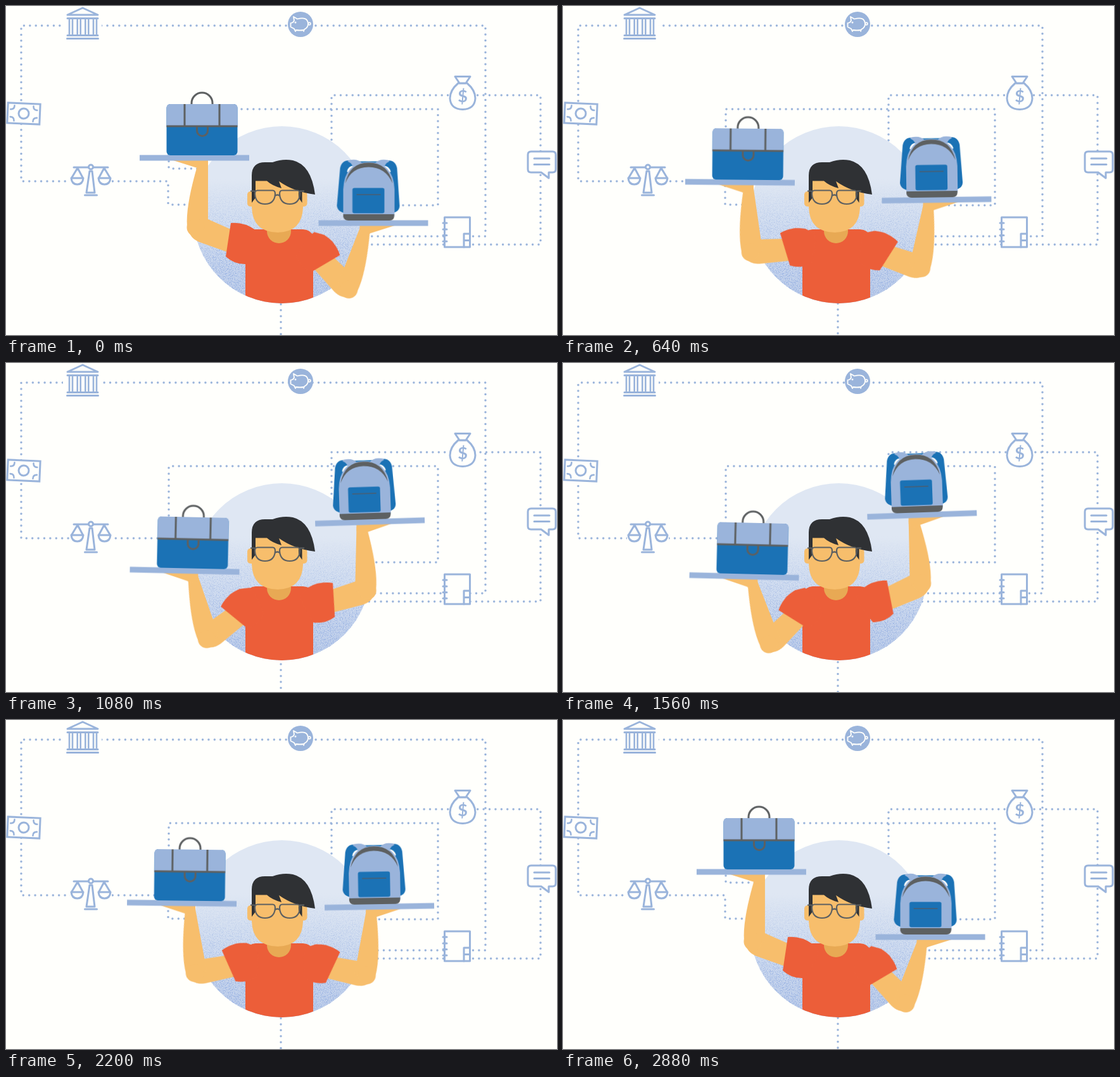
An HTML page for the animation above (2920 ms loop, 870 by 520 pixels).

```html
<!DOCTYPE html>
<html lang="en">
<head>
<meta charset="utf-8">
<title>Weighing the options</title>
<style>
  html, body { margin: 0; width: 100%; height: 100%; overflow: hidden; background: #fffffc; }
  svg { display: block; width: 870px; height: 520px; }

  .paper { fill: #fffffc; }
  .pale { fill: #9ab4db; }
  .blue { fill: #1b72b5; }
  .gray { fill: #5d6061; }
  .skin { fill: #f7be6c; }
  .shirt { fill: #ec5e39; }
  .hair { fill: #2f3134; }
  .line { fill: none; stroke: #5d6061; stroke-width: 3; }
  .icons { fill: none; stroke: #9ab4db; stroke-width: 3; stroke-linecap: round; stroke-linejoin: round; }
  .icons .back { fill: #fffffc; }
  .icons .gap { fill: #fffffc; stroke: none; }
  .icons text { fill: #9ab4db; stroke: none; font: bold 27px Lato, sans-serif; text-anchor: middle; }

  .dots {
    fill: none; stroke: #9ab4db; stroke-width: 3.5; stroke-linecap: round;
    stroke-dasharray: 0 9.4; animation: flow 2920ms linear infinite;
  }
  @keyframes flow { to { stroke-dashoffset: -37.6px; } }

  /* Each joint swings between --a and --b */
  .joint { animation: swing 1460ms cubic-bezier(.5, 0, .5, 1) infinite alternate; }
  @keyframes swing {
    from { transform: rotate(var(--a)); }
    to { transform: rotate(var(--b)); }
  }
  .shoulder { transform-origin: 384px 378px; }
  .elbow { transform-origin: 299px 350px; }
  .wrist { transform-origin: 310px 250px; }
  .left .shoulder { --a: 0deg; --b: -67deg; }
  .left .elbow { --a: 0deg; --b: 45.5deg; }
  .left .wrist { --a: 0deg; --b: 22.9deg; }
  .right .shoulder { --a: -68deg; --b: 3deg; }
  .right .elbow { --a: 46.5deg; --b: -1.7deg; }
  .right .wrist { --a: 21.5deg; --b: .7deg; }
</style>
</head>
<body>
<svg viewBox="0 0 870 520" xmlns="http://www.w3.org/2000/svg">
  <defs>
    <linearGradient id="sky" x1="0" y1="0" x2="0" y2="1">
      <stop offset=".3" stop-color="#dfe7f3"/>
      <stop offset=".65" stop-color="#cddaef"/>
      <stop offset="1" stop-color="#bccce9"/>
    </linearGradient>
    <linearGradient id="fade" x1="0" y1="0" x2="0" y2="1">
      <stop offset=".32" stop-color="#000"/>
      <stop offset=".8" stop-color="#fff"/>
    </linearGradient>
    <clipPath id="disc"><circle cx="435.5" cy="330" r="140"/></clipPath>
    <mask id="low"><circle cx="435.5" cy="330" r="140" fill="url(#fade)"/></mask>
    <filter id="grain" x="0" y="0" width="1" height="1" color-interpolation-filters="sRGB">
      <feTurbulence type="fractalNoise" baseFrequency=".8" numOctaves="2" seed="4"/>
      <feColorMatrix values="0 0 0 0 .56  0 0 0 0 .67  0 0 0 0 .88  5 0 0 0 -2.5"/>
    </filter>

    <!-- Arm parts, in the raised pose -->
    <g id="upper">
      <path class="skin" d="M362 356L355 353L319 337L300 338L288 352Q290 367 305 373L347 388L362 393Z"/>
      <path class="shirt" d="M355 343Q376 341 394 354L404 367L400 380L380 408Q361 409 347 396Z"/>
    </g>
    <g id="fore">
      <path class="skin" d="M302 253Q281 325 287 356L299 362L319 350V250Z"/>
      <circle class="skin" cx="299.5" cy="350" r="14"/>
    </g>
    <g id="hand">
      <path class="skin" d="M264 244H319V254Q311 262 302 256Z"/>
      <rect class="pale" x="211" y="235.5" width="173" height="9"/>
    </g>

    <g id="briefcase">
      <path class="line" d="M293 155V153.5A16.5 16.5 0 0 1 326 153.5V155"/>
      <rect class="blue" x="253.5" y="155" width="112" height="81" rx="6"/>
      <path class="pale" d="M253.5 190V161Q253.5 155 259.5 155H359.5Q365.5 155 365.5 161V190Z"/>
      <path class="line" d="M253.5 190H365.5M282 155V190M337 155V190M301.5 190V197A8.5 8.5 0 0 0 318.5 197V190"/>
    </g>

    <g id="backpack">
      <path class="blue" d="M552 246Q532 240 529 257L524 316Q525 327 540 328H608Q623 327 623 316L619 257Q616 240 596 246Z"/>
      <path class="paper" d="M540 262Q542 252 552 253H596Q606 252 609 262L600 275H550Z"/>
      <path class="pale" d="M543 244Q557 241 564 249L549 262Q552 251 541 246ZM605 244Q591 241 584 249L600 262Q596 251 607 246Z"/>
      <path class="pale" d="M534 332V290Q536 247 574 247Q613 247 615 290V332Z"/>
      <path class="gray" d="M537 281Q544 248 574 248Q605 248 612 281Q601 255 574 255Q547 255 537 281Z"/>
      <rect class="blue" x="548.5" y="288" width="50.5" height="40" rx="3"/>
      <path d="M555 298.5H593" stroke="#3f6280" stroke-width="1.8"/>
      <path class="gray" d="M534 329.5H614.5V333Q614 339.5 607 339.5H542Q535 339.5 534 333Z"/>
    </g>
  </defs>

  <rect class="paper" width="870" height="520"/>

  <g class="dots">
    <path d="M310 314H256V277H24V31H757V364H560"/>
    <path d="M330 257H257V163H682V315H560"/>
    <path d="M514 230V141H844V377H560"/>
    <path d="M434 462V524"/>
  </g>

  <g class="icons">
    <!-- Bank -->
    <rect class="gap" x="90" y="22" width="61" height="20"/>
    <path d="M97 14L121 3L145 14ZM97 19.5H145M97 46.5H145M96.5 51.5H145.5"/>
    <path d="M100 20V46M105 20V46M112.7 20V46M117.7 20V46M125.3 20V46M130.3 20V46M138 20V46M143 20V46" stroke-width="2.6"/>

    <!-- Banknote -->
    <g transform="rotate(2.5 28 170)">
      <rect class="back" x="2.5" y="154" width="51" height="32" stroke-linejoin="miter"/>
      <circle cx="28" cy="170" r="8"/>
      <path d="M7 164Q13 164 13 158M49 164Q43 164 43 158M7 176Q13 176 13 182M49 176Q43 176 43 182" stroke-width="2.6"/>
    </g>

    <!-- Scales -->
    <rect class="gap" x="101" y="266" width="66" height="22"/>
    <path d="M107 255H130M138 255H161M113 256L104 271M113 256L121 271M155 256L147 271M155 256L164 271"/>
    <path d="M103 272H122Q121 282 112.5 282Q104 282 103 272ZM146 272H165Q164 282 155.5 282Q147 282 146 272Z"/>
    <path class="back" d="M132 261L127 295H140L136 261Z"/>
    <circle class="back" cx="134" cy="254.5" r="3.5"/>
    <path d="M124.5 299H143.5"/>

    <!-- Piggy bank -->
    <circle class="pale" cx="465" cy="29" r="20" stroke="none"/>
    <g stroke="#fffffc" stroke-width="1.8">
      <path d="M455 23L454 17L460 20.500Q476 16 477 28Q477 34 471 37L470 40M470 38Q464 39 458 38L457 40L455 36L449.500 33V27L453 26L455 23"/>
      <circle cx="479" cy="28" r="1.8"/>
      <circle cx="457" cy="26" r=".6"/>
    </g>

    <!-- Money bag -->
    <path class="back" d="M714 122Q701 133 701 146Q702 163 721 163.5Q740 163 741 146Q741 133 728 122Z"/>
    <path class="back" d="M709 111.5H733L726 122H716Z"/>
    <text x="721" y="152">$</text>

    <!-- Message -->
    <path class="back" d="M829 230H863Q868 230 868 235V258Q868 263 863 263H857V272L845 263H829Q824 263 824 258V235Q824 230 829 230Z"/>
    <path d="M834 241H858M834 250.5H858"/>

    <!-- Notebook -->
    <rect class="back" x="692.5" y="334" width="40" height="47"/>
    <path d="M690 343H696M690 353H696M690 362.5H696M690 372H696M723 381V360H732M723 370.5H732"/>
  </g>

  <circle cx="435.5" cy="330" r="140" fill="url(#sky)"/>
  <g mask="url(#low)"><rect x="295" y="190" width="281" height="281" filter="url(#grain)" opacity=".9"/></g>

  <g clip-path="url(#disc)">
    <path class="shirt" d="M378 480V364Q383 354 394 353H469Q482 354 485 364V480Z"/>
  </g>

  <g class="left">
    <g class="joint shoulder">
      <use href="#upper"/>
      <g class="joint elbow">
        <use href="#fore"/>
        <g class="joint wrist">
          <use href="#hand"/>
          <use href="#briefcase"/>
        </g>
      </g>
    </g>
  </g>

  <g class="right" transform="translate(868 2) scale(-1 1)">
    <g class="joint shoulder">
      <use href="#upper"/>
      <g class="joint elbow">
        <use href="#fore"/>
        <g transform="translate(0 2)">
          <g class="joint wrist">
            <use href="#hand"/>
            <use href="#backpack" transform="translate(879 -103.5) scale(-1 1)"/>
          </g>
        </g>
      </g>
    </g>
  </g>

  <!-- Head -->
  <path d="M412 350H450V356A19 19 0 0 1 412 356Z" fill="#e8a954"/>
  <rect class="skin" x="381" y="293" width="14" height="24" rx="5"/>
  <rect class="skin" x="462" y="293" width="13.5" height="24" rx="5"/>
  <path class="skin" d="M388 272H469V318Q468 357 429 358Q389 357 388 318Z"/>
  <path class="hair" d="M388 311V268Q388 247 409 247H421Q437 241 453 244Q482 251 488 298Q455 294 431 277L435 288Q420 284 412 276.5H394V303Z"/>
  <path class="hair" d="M462 290H467.5V311L462 303Z"/>
  <path class="line" style="stroke-width:2.2" d="M386 292.5H393M464 292.5H471M425 300Q428.5 297 432 300M397 291.5H421Q425 291.5 425 297Q424 313 409 313Q394 313 393 297Q393 291.5 397 291.5ZM436 291.5H460Q464 291.5 464 297Q463 313 448 313Q433 313 432 297Q432 291.5 436 291.5Z"/>
</svg>
</body>
</html>
```
